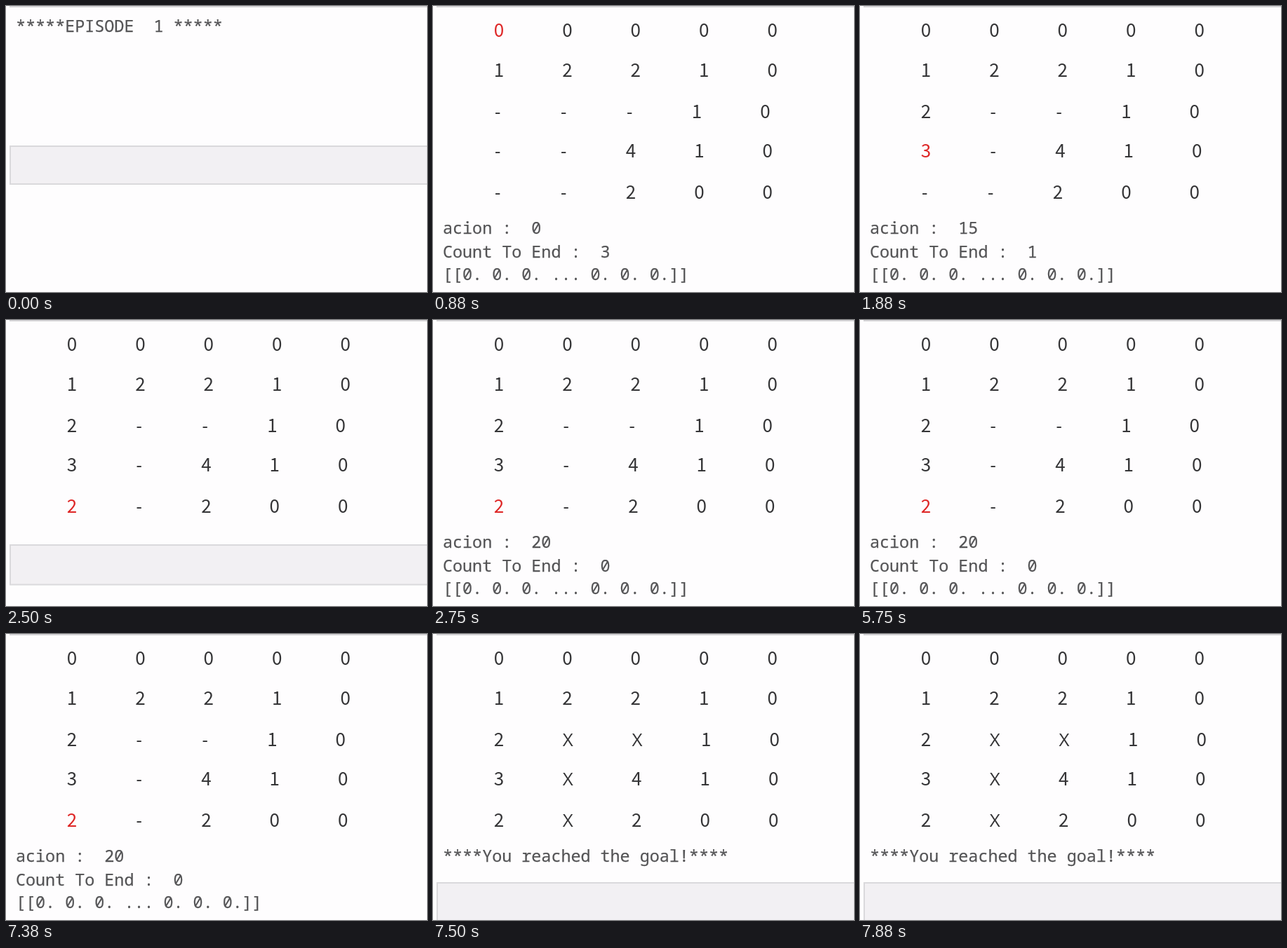
Recreate the animation shown at these times as an HTML page. Size 600 by 408 pixels, loop 8000 ms.

```html
<!DOCTYPE html>
<html lang="en">
<head>
<meta charset="utf-8">
<title>Grid episode</title>
<style>
  html, body { margin: 0; width: 100%; height: 100%; overflow: hidden; background: #fefdfe; }
  svg { display: block; width: 600px; height: 408px; }
  .cell { font: 26px "Noto Sans CJK KR", "Noto Sans CJK JP", "Open Sans", sans-serif; fill: #343436; text-anchor: middle; }
  .sign { font-family: "Open Sans", "Noto Sans", sans-serif; }
  .hot { fill: #de2626; }
  .log { font: 23.4px "Noto Sans Mono", "DejaVu Sans Mono", monospace; fill: #545456; stroke: #545456; stroke-width: 0.25; white-space: pre; }
  .bar { fill: #f2f0f3; stroke: #dad9dc; stroke-width: 2; }
</style>
</head>
<body>
<svg id="stage" viewBox="0 0 600 408"></svg>
<script>
const LOOP = 8000;
const BASELINES = [44, 100.5, 160, 216, 275];
const LEFT = 87, GAP = 83.4;
const LOG_LINES = [324.5, 358.5, 390.5];
const stage = document.getElementById('stage');

const hidden = ['00000', '12210', '---10', '--410', '--200'];
const opened = ['00000', '12210', '2--10', '3-410', '2-200'];

// Rows up to `row` are opened; the newest cell is red.
const board = row => hidden.map((line, i) => i <= row ? opened[i] : line);
const report = (action, left) =>
  ['acion :  ' + action, 'Count To End :  ' + left, '[[0. 0. 0. ... 0. 0. 0.]]'];

const scenes = [
  { at: 0, title: '*****EPISODE  1 *****', bar: [200, 54] },
  { at: 880, rows: board(0), hot: 0, log: report(0, 3) },
  { at: 1380, rows: board(2), hot: 2, log: report(10, 2) },
  { at: 1880, rows: board(3), hot: 3, log: report(15, 1) },
  { at: 2500, rows: board(4), hot: 4, bar: [321, 56.5] },
  { at: 2630, rows: board(4), hot: 4, log: report(20, 0) },
  { at: 7500, rows: opened.map(line => line.replace(/-/g, 'X')), hot: -1,
    log: ['****You reached the goal!****'], bar: [355, 70] }
];

const advance = c => c === '-' ? 10.6 : c === 'X' ? 15.5 : 14;

function rowMarkup(line, i, hot) {
  let x = LEFT, out = '';
  [...line].forEach((c, col) => {
    const w = advance(c);
    const cls = 'cell' + (/\d/.test(c) ? '' : ' sign') + (i === hot && col === 0 ? ' hot' : '');
    out += `<text class="${cls}" x="${x + w / 2}" y="${BASELINES[i]}">${c}</text>`;
    x += w + GAP;
  });
  return out;
}

const logMarkup = (text, y) => `<text class="log" x="14" y="${y}">${text}</text>`;

function sceneMarkup({ title, rows = [], hot, log = [], bar }) {
  let out = '<rect x="5" y="0" width="595" height="2" fill="#d5d4d7"/>';
  if (bar) out += `<rect class="bar" x="6" y="${bar[0]}" width="610" height="${bar[1]}"/>`;
  if (title) out += logMarkup(title, 37);
  out += rows.map((line, i) => rowMarkup(line, i, hot)).join('');
  return out + log.map((text, i) => logMarkup(text, LOG_LINES[i])).join('');
}

let shown = null;
function render(t) {
  const scene = scenes.filter(s => s.at <= t).pop();
  if (scene === shown) return;
  shown = scene;
  stage.innerHTML = sceneMarkup(scene);
}

const start = performance.now();
function tick() {
  render((performance.now() - start) % LOOP);
  requestAnimationFrame(tick);
}
tick();
</script>
</body>
</html>
```
